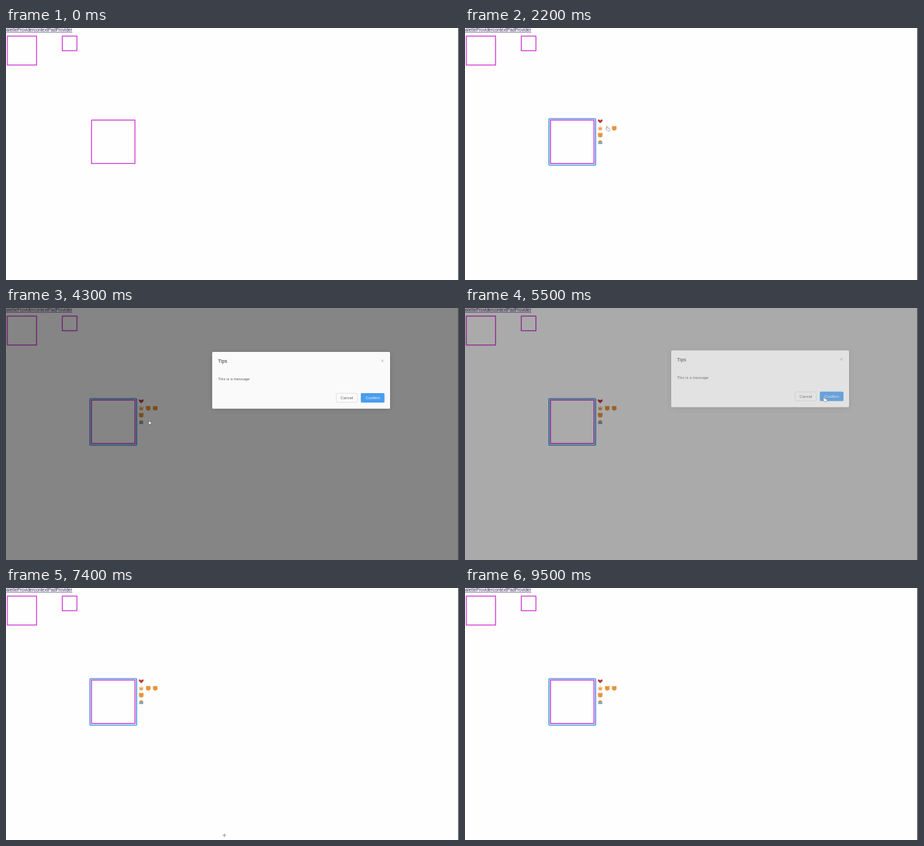
Animation, 670 px wide and 373 px high, one loop 9800 ms. Source, as an HTML page:

```html
<!DOCTYPE html>
<html lang="en">
<head>
<meta charset="utf-8">
<title>Context pad</title>
<style>
  html, body { margin: 0; width: 100%; height: 100%; overflow: hidden; background: #fefefe; }
  svg { display: block; width: 670px; height: 373px; font-family: "Liberation Sans", Arial, sans-serif; }
  .shape { fill: none; stroke: #cf32d2; stroke-width: 1.3; }
  .outline { fill: #e3f0fb; stroke: #3c97dd; stroke-width: 1.4; }
  .panel { filter: drop-shadow(0 1px 4px rgba(0, 0, 0, .12)); }
</style>
</head>
<body>
<svg viewBox="0 0 670 373">
  <defs>
    <g id="heart">
      <path d="M0 3C-5 0-4-3-1.8-2.6L0-1.6 1.8-2.6C4-3 5 0 0 3Z" fill="#cf424c"/>
      <path d="M-2.6-1.4h1.6M1-1.4h1.6M-.8.6h1.6" stroke="#6e2630" stroke-width=".9"/>
    </g>
    <g id="paw">
      <path d="M-3.2-1.8-1.6.2M0-3.2V0M3.2-1.8 1.6.2" stroke="#eda95c" stroke-width="1.1"/>
      <ellipse cy="1.1" rx="2.9" ry="2.1" fill="#f0ad68"/>
      <path d="M-1 .8h.8M.5.8h.8" stroke="#c56d4a" stroke-width=".8"/>
    </g>
    <g id="bear" fill="#e99a42">
      <circle cx="-2.2" cy="-2.2" r="1.2"/>
      <circle cx="2.2" cy="-2.2" r="1.2"/>
      <ellipse cy=".3" rx="3.5" ry="3.3"/>
      <path d="M-1.8-1.2H1.6M-.8 1.2H1.2" stroke="#c87832" stroke-width=".6"/>
    </g>
    <g id="diver">
      <path d="M-3.2.5C-3-4.2 3-4.2 3.2.5Z" fill="#e49a55"/>
      <path d="M-3.5.5h7L2.6 2.8h-5.2Z" fill="#5da7d3"/>
      <path d="M-1.6-.5h1M.8-.5h1" stroke="#75503e" stroke-width=".7"/>
    </g>
  </defs>

  <rect width="670" height="373" fill="#fefefe"/>
  <g font-size="6.53" fill="#35255c">
    <text x="-3" y="5">paletteProvider</text>
    <text x="41" y="5">contextPadProvider</text>
    <path d="M0 6.3H98" stroke="#503f78" stroke-width=".7"/>
  </g>
  <rect class="shape" x="2" y="12" width="43.2" height="42.8"/>
  <rect class="shape" x="83.3" y="12" width="21.6" height="21.6"/>
  <g id="selection">
    <rect class="outline" x="124.1" y="134.1" width="69.2" height="69" rx="1"/>
    <rect x="126.5" y="136.5" width="64" height="64" fill="#fefefe"/>
  </g>
  <rect class="shape" x="126.5" y="136.3" width="64.2" height="64.2"/>
  <g id="pad"></g>
  <path d="M669.4 0V373" stroke="#4a4a4a" stroke-width="1.2"/>

  <rect id="shade" width="669" height="373"/>
  <g id="dialog">
    <rect class="panel" x="305" y="65.2" width="263" height="84" rx="1.5" fill="#fff"/>
    <text x="313.6" y="81.5" font-size="7.4" fill="#303133">Tips</text>
    <path d="M554.9 76.7l3.6 3.6m0-3.6l-3.6 3.6" stroke="#a3a6ab" stroke-width=".7"/>
    <text x="313.6" y="107.6" font-size="5.8" fill="#606266">This is a message</text>
    <rect x="488.4" y="126.6" width="31.2" height="13.4" rx="1.6" fill="#fff" stroke="#dcdfe6" stroke-width=".8"/>
    <rect x="524.8" y="126.3" width="35" height="14" rx="1.6" fill="#489ff3"/>
    <g font-size="6" text-anchor="middle">
      <text x="504" y="135.4" fill="#606266">Cancel</text>
      <text x="542.4" y="135.4" fill="#fff">Confirm</text>
    </g>
  </g>

  <g id="cursor">
    <path id="arrow" d="M-2-3.4V3L-.4 1.6 3 .4Z" fill="#fff" stroke="#333" stroke-width=".5"/>
    <path id="hand" d="M-1.8-3.4q.8-.6 1.2.2L.4-.6 2.8.1q.8.3.7 1.2L3 3.5H0L-2.6.8q-.1-1 1-.5Z"
          fill="#fff" stroke="#777" stroke-width=".6"/>
    <path id="cross" d="M-2.6 0H2.6M0-2.6V2.6" stroke="#777" stroke-width=".8"/>
  </g>
</svg>
<script>
const LOOP = 9800, STEP = 100;
const $ = id => document.getElementById(id);

const icons = [
  ["heart", 200, 138], ["paw", 200, 148.3], ["bear", 210.4, 148.3],
  ["bear", 220.7, 148.3], ["bear", 200, 158.5], ["diver", 200, 169]
].map(([name, x, y]) => {
  const node = document.createElementNS("http://www.w3.org/2000/svg", "use");
  node.setAttribute("href", "#" + name);
  node.setAttribute("transform", `translate(${x} ${y})`);
  $("pad").append(node);
  return { node, x, y };
});

// time, x, y, cursor shape until the next row
const path = [
  [0, 340, 385, ""], [100, 334, 368, "arrow"], [800, 172, 182, "arrow"],
  [1000, 172, 182, "arrow"], [1200, 165, 175, "arrow"], [1600, 165, 175, "arrow"],
  [1900, 200, 153, "hand"], [2200, 211, 149, "hand"], [2400, 211, 149, "hand"],
  [2800, 220, 149, "hand"], [3300, 201, 159, "hand"], [3500, 201, 159, "hand"],
  [3900, 200.5, 171, "hand"], [4200, 213, 170.3, "arrow"], [4300, 213, 170.3, "arrow"],
  [4900, 532, 135, "hand"], [5600, 532, 135, "arrow"], [6100, 204, 150, "hand"],
  [6200, 215, 165, "cross"], [6500, 323, 364, "cross"], [6900, 323, 366, "cross"],
  [7500, 323, 366, "cross"], [7700, 275, 315, "arrow"], [8500, 203, 171, "hand"],
  [8800, 215, 185, "arrow"], [9400, 400, 370, "arrow"], [9500, 420, 390, ""], [LOOP, 420, 390, ""]
];

const clamp = v => Math.max(0, Math.min(1, v));

function cursorAt(t) {
  const i = path.findIndex(row => row[0] > t) - 1;
  const [t0, x0, y0, shape] = path[i], [t1, x1, y1] = path[i + 1];
  const p = (t - t0) / (t1 - t0);
  return { x: x0 + (x1 - x0) * p, y: y0 + (y1 - y0) * p, shape };
}

function dialogOpacity(t) {
  const opening = 1 - (1 - clamp((t - 4100) / 250)) ** 2;
  return Math.min(opening, 1 - clamp((t - 5400) / 300));
}

function draw(t) {
  const selected = t >= 1400;
  $("selection").style.opacity = $("pad").style.opacity = +selected;

  const shown = dialogOpacity(t);
  $("shade").style.opacity = shown / 2;
  $("dialog").style.opacity = shown;
  $("dialog").setAttribute("transform", `translate(0 ${-7.5 * (1 - shown)})`);

  const { x, y, shape } = cursorAt(t);
  $("cursor").setAttribute("transform", `translate(${x} ${y})`);
  for (const id of ["arrow", "hand", "cross"]) $(id).style.opacity = +(id === shape);
  for (const icon of icons) {
    const hovered = shape === "hand" && Math.hypot(icon.x - x, icon.y - y) < 4;
    icon.node.style.opacity = hovered ? 0.12 : 1;
  }
}

const start = performance.now();
function tick() {
  const t = (performance.now() - start) % LOOP;
  draw(Math.floor(t / STEP) * STEP);
  requestAnimationFrame(tick);
}
tick();
</script>
</body>
</html>
```
